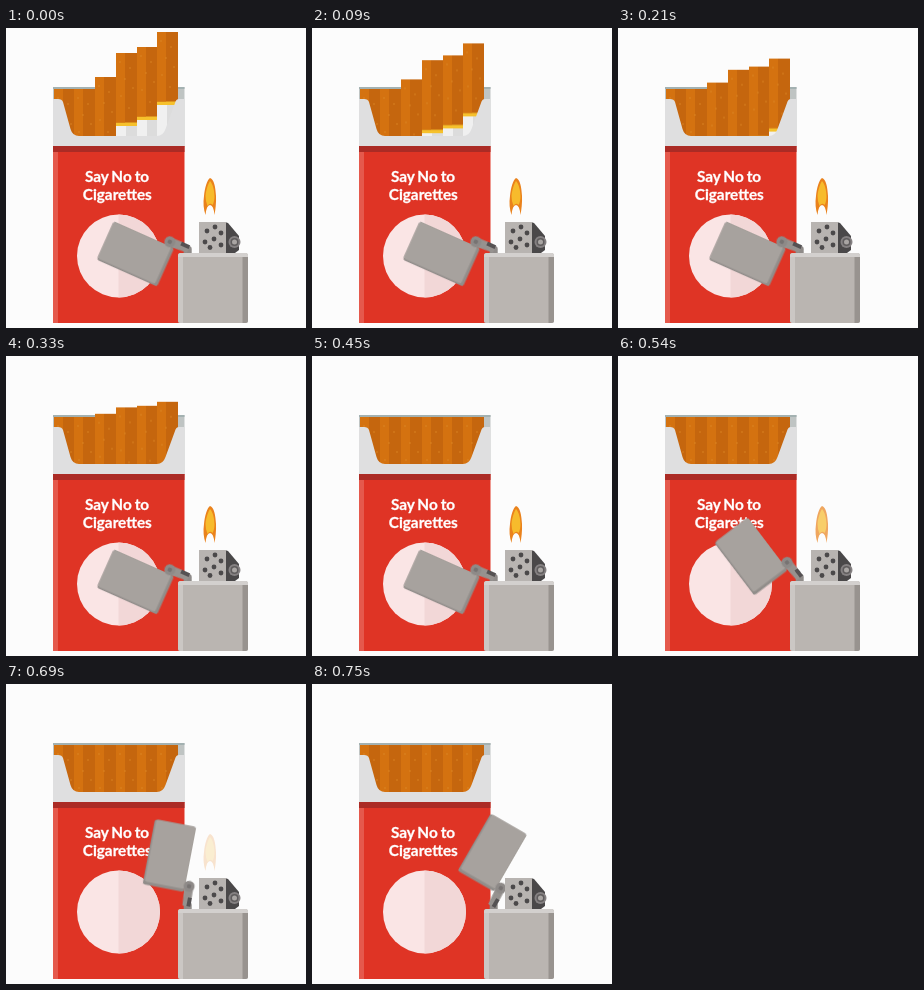
An HTML page without scripts for the animation above (1.47 s loop, 300 by 300 pixels).

```html
<!DOCTYPE html>
<html lang="en">
<head>
<meta charset="utf-8">
<title>Say No to Cigarettes</title>
<style>
  html, body { margin: 0; width: 100%; height: 100%; overflow: hidden; background: #fcfcfc; }
  svg { display: block; width: 100%; height: 100%; }

  /* 0–450 ms: cigarettes sink; 450–750 ms: lid swings, flame fades */
  .cig, .lid, .flame { animation: 1470ms -1ms infinite; }
  .cig { animation-name: sink; }
  .lid { animation-name: swing; }
  .flame { animation-name: fade; }

  @keyframes sink {
    0% { transform: translateY(var(--rise)); animation-timing-function: steps(15, end); }
    30.612%, 100% { transform: translateY(0); }
  }
  @keyframes swing {
    0%, 30.612% { transform: rotate(-66deg); animation-timing-function: steps(10, end); }
    51.02%, 100% { transform: rotate(30deg); }
  }
  @keyframes fade {
    0%, 30.612% { opacity: 1; animation-timing-function: steps(10, end); }
    51.02%, 100% { opacity: 0; }
  }

  .title {
    font: 700 15.3px Lato, "Open Sans", sans-serif;
    word-spacing: -.8px;
    fill: #fff;
    stroke: #fff;
    stroke-width: .3px;
    text-anchor: middle;
  }
</style>
</head>
<body>
<svg viewBox="0 0 300 300">
  <defs>
    <g id="cig">
      <rect width="21" height="140" fill="#dcdcdc"/>
      <rect width="10" height="140" fill="#f0f0f0"/>
      <rect width="21" height="73" fill="#f6c12c"/>
      <rect width="21" height="69.5" fill="#c5660e"/>
      <rect width="9" height="69.5" fill="#d47210"/>
      <g fill="#de8a2c">
        <circle cx="4" cy="9" r=".7"/>
        <circle cx="14" cy="15" r=".7"/>
        <circle cx="9" cy="26" r=".7"/>
        <circle cx="17" cy="35" r=".7"/>
        <circle cx="5" cy="43" r=".7"/>
        <circle cx="13" cy="55" r=".7"/>
      </g>
    </g>
  </defs>

  <!-- pack interior -->
  <rect x="47" y="59" width="131.500" height="60" fill="#bfc4c3"/>
  <rect x="47" y="59" width="131.500" height="2" fill="#a3b1b1"/>

  <!-- cigarettes -->
  <g transform="translate(48 61)"><use href="#cig"/></g>
  <g transform="translate(68 61)"><use href="#cig"/></g>
  <g transform="translate(89 61)"><use class="cig" style="--rise: -12px" href="#cig"/></g>
  <g transform="translate(110 61)"><use class="cig" style="--rise: -36px" href="#cig"/></g>
  <g transform="translate(131 61)"><use class="cig" style="--rise: -42px" href="#cig"/></g>
  <g transform="translate(151 61)"><use class="cig" style="--rise: -57px" href="#cig"/></g>

  <!-- pack front -->
  <path d="M47 71H52Q56 71 57 74L64.500 101Q66.500 108 73 108H151Q157 108 159.500 101L169 75Q170 71 173 71H178.500V119H47Z" fill="#dfdfe0"/>
  <rect x="47" y="118" width="131.500" height="177" fill="#df3425"/>
  <rect x="47" y="118" width="5" height="177" fill="#e5594c"/>
  <rect x="47" y="118" width="131.500" height="6" fill="#ab2b25"/>
  <circle cx="112.500" cy="228" r="41.500" fill="#fae5e5"/>
  <path d="M112.500 186.500a41.500 41.500 0 0 1 0 83Z" fill="#f2d7d7"/>
  <text class="title" x="111" y="153.500">Say No to</text>
  <text class="title" x="111.300" y="171.500">Cigarettes</text>

  <!-- lid, drawn upright around its pivot -->
  <g transform="translate(180.700 220.200)">
    <path d="M-3 -2H3Q5 -2 5 1V5H-3Z" fill="#8f8b89"/>
    <g class="lid">
      <rect x="-47.100" y="-77.500" width="42" height="66" rx="2.500" fill="#918d8a"/>
      <rect x="-45.600" y="-77.500" width="40.500" height="63" rx="2.500" fill="#a7a29e"/>
      <path d="M-5.500 -18H3.500L4 2H-4Z" fill="#96928f"/>
      <path d="M0 -7H4V2H0Z" fill="#555253"/>
      <circle cx="-1" cy="-18" r="5.500" fill="#8e8a88"/>
      <circle cx="-1" cy="-18" r="2.200" fill="#777372"/>
    </g>
  </g>

  <!-- flame -->
  <g class="flame">
    <path d="M204 150C208 151 209.500 159 210 168C210.300 175 209.500 181 208.500 187Q207.500 177 204 177Q200.500 177 199.500 187C197.500 181 197 175 198 168C198.800 160 201 152 204 150Z" fill="#ea821c"/>
    <path d="M204 153C207 156 208.500 163 208.500 169Q208 175 206.500 177Q204 174 201.500 178Q199.500 173 199.500 168C200 162 202 156 204 153Z" fill="#f7bb2c"/>
  </g>

  <!-- lighter -->
  <path d="M219 194L222 195L233 208V222L229 225H219Z" fill="#4a4849"/>
  <circle cx="228.500" cy="214" r="6" fill="#858182"/>
  <circle cx="228.500" cy="214" r="4" fill="#5f5c5d"/>
  <circle cx="228.500" cy="214" r="2.500" fill="#a9a5a3"/>
  <rect x="193" y="194" width="27" height="32" fill="#b8b4b1"/>
  <g fill="#4b494a">
    <circle cx="201" cy="203" r="2.400"/>
    <circle cx="209" cy="199" r="2.400"/>
    <circle cx="215" cy="205" r="2.400"/>
    <circle cx="199" cy="214" r="2.400"/>
    <circle cx="208" cy="211" r="2.400"/>
    <circle cx="215" cy="217" r="2.400"/>
    <circle cx="204" cy="219.500" r="2.400"/>
  </g>
  <rect x="172" y="225" width="70" height="70" rx="2.500" fill="#bab5b1"/>
  <path d="M172 229H177V295H174.500Q172 295 172 292.500Z" fill="#cbc7c4"/>
  <path d="M236.500 229H242V292.500Q242 295 239.500 295H236.500Z" fill="#98938f"/>
  <path d="M172 229V227.500Q172 225 174.500 225H239.500Q242 225 242 227.500V229Z" fill="#d3d0ce"/>
</svg>
</body>
</html>
```
